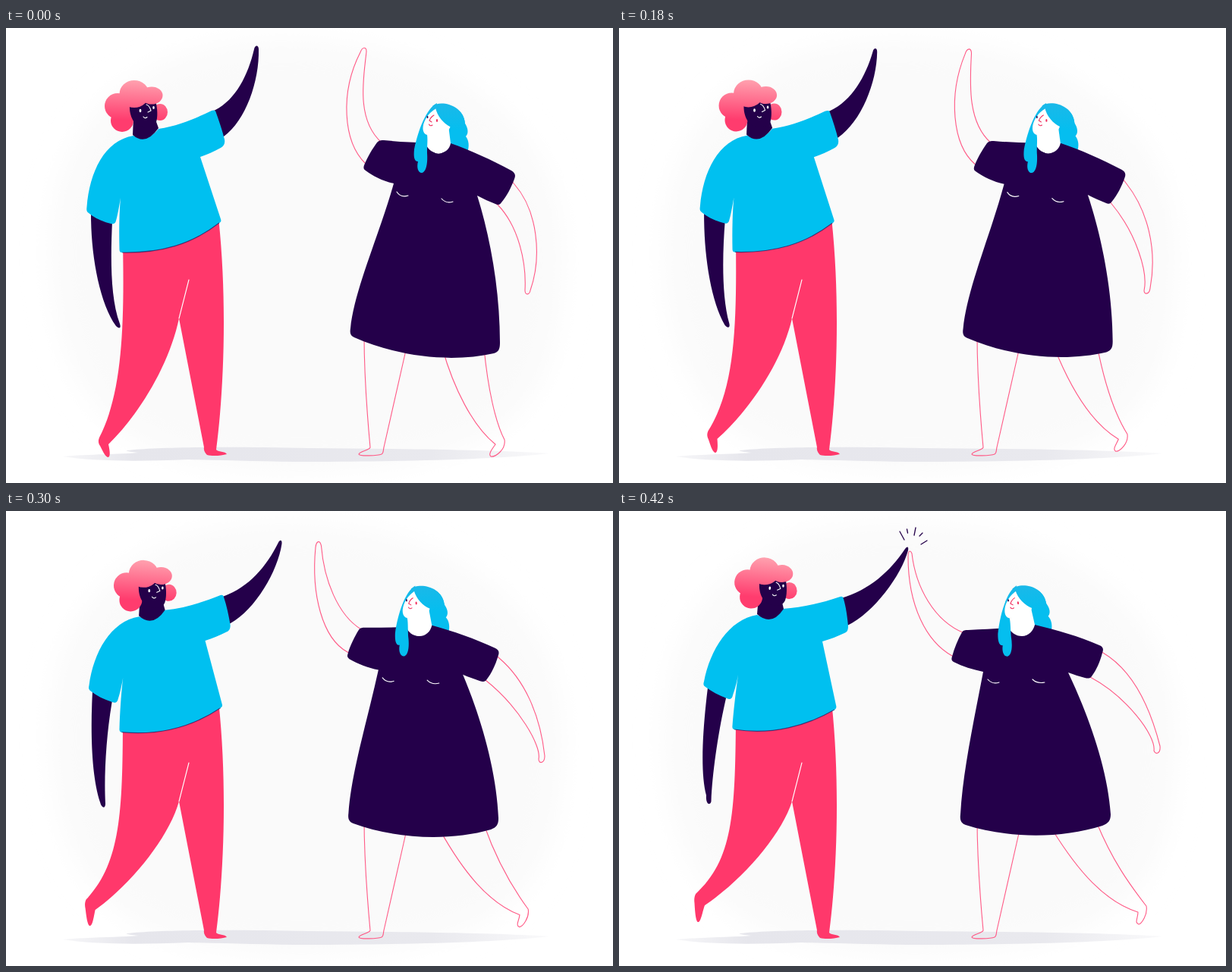
These frames come from a looping animation (800 px wide and 600 px high, 2700 ms). An HTML page:

```html
<!DOCTYPE html>
<html lang="en">
<head>
<meta charset="utf-8">
<title>High five</title>
<style>
  html, body { margin: 0; width: 100%; height: 100%; overflow: hidden; background: #fff; }
  svg { display: block; width: 100vw; height: 100vh; }
  .dark { fill: #24004a; }
  .blue { fill: #00c0f0; }
  .pink { fill: #ff386b; }
  .white { fill: #fff; }
  .limb { fill: none; stroke: #ff5a86; stroke-width: 1.1; stroke-linejoin: round; }
  .line { fill: none; stroke: #fff; stroke-width: 1.1; stroke-linecap: round; }
  .hem { fill: none; stroke: #24004a; stroke-width: 1.2; stroke-opacity: .6; }
  .feature { fill: none; stroke: #f0305f; stroke-width: 1.1; stroke-linecap: round; }
  .spark { fill: none; stroke: #24004a; stroke-width: 1.3; stroke-linecap: round; }
</style>
</head>
<body>
<svg viewBox="0 0 800 600">
  <defs>
    <filter id="soft" x="-20%" y="-20%" width="140%" height="140%"><feGaussianBlur stdDeviation="18"/></filter>
    <linearGradient id="ground" gradientUnits="userSpaceOnUse" x1="70" x2="725" y1="0" y2="0">
      <stop offset="0" stop-color="#e6e6ec" stop-opacity=".3"/>
      <stop offset=".15" stop-color="#e6e6ec"/>
      <stop offset=".75" stop-color="#e9e9ee"/>
      <stop offset="1" stop-color="#e9e9ee" stop-opacity=".2"/>
    </linearGradient>
    <linearGradient id="curls" gradientUnits="userSpaceOnUse" x1="172" x2="170" y1="68" y2="122">
      <stop offset="0" stop-color="#ffa3b0"/>
      <stop offset="1" stop-color="#ff3c6e"/>
    </linearGradient>
    <linearGradient id="locks" gradientUnits="userSpaceOnUse" x1="0" x2="0" y1="97" y2="135">
      <stop offset="0" stop-color="#1cb8e8"/>
      <stop offset="1" stop-color="#05beef"/>
    </linearGradient>
  </defs>
  <path filter="url(#soft)" fill="#fafafa" d="M330 18C560 8 735 110 732 300C730 480 690 570 420 584C170 590 80 520 62 330C50 160 130 35 330 18Z"/>
  <path fill="url(#ground)" d="M75 565C110 562 150 562 175 560C165 559 158 558 159 557C200 552 300 552 400 554C520 555 640 556 716 561C650 569 510 572 400 572C340 572 290 570 240 569C170 572 110 571 75 565Z"/>
  <g id="scene"></g>
  <path id="sparks" class="spark" d="M370 27L376 38M379.500 24L380.500 29M391 22L389 32M400 29L396 33M406 39L398 44"/>
</svg>
<script>
const LOOP = 2700, START = 90, STEP = 30, MID_STEP = 7, LAST_STEP = 11;

// progress at each step of the movement
const ease = {
  arm: [.01, .03, .085, .15, .235, .355, .49, .635, .79, .935, .98, 1],
  man: [.01, .02, .04, .07, .13, .24, .37, .54, .76, .94, .99, 1],
  manLeg: [0, .05, .13, .25, .38, .52, .66, .79, .9, .98, 1, 1],
  woman: [.01, .025, .06, .11, .18, .3, .45, .65, .82, .96, .99, 1],
  womanLeg: [0, .1, .21, .34, .47, .6, .72, .82, .91, .98, 1, 1]
};

const manHead = `
  <ellipse fill="url(#curls)" cx="203" cy="111" rx="10" ry="11"/>
  <g fill="url(#curls)">
    <ellipse cx="147" cy="103" rx="17" ry="17"/>
    <ellipse cx="153" cy="122" rx="15" ry="15"/>
    <ellipse cx="164" cy="106" rx="10" ry="12"/>
  </g>
  <path class="dark" d="M163 101L197 96C200 106 200 118 198 124C196 130 189 133 180 131C170 129 162 118 163 101Z"/>
  <g fill="url(#curls)">
    <ellipse cx="169" cy="87" rx="19.500" ry="18"/>
    <ellipse cx="192" cy="89" rx="14.500" ry="11.500"/>
  </g>
  <ellipse class="white" cx="177" cy="109" rx="1.4" ry="2.2"/>
  <ellipse class="white" cx="194.500" cy="105" rx="1.3" ry="2"/>
  <path class="line" d="M185 101Q189 102 191 109L187 111M181 117Q183 120 186 117.500"/>`;

const womanHead = `
  <path class="white" d="M566 103C558 110 553 122 550 133C549 139 554 141 559 140C570 145 584 140 586 128L580 108Z"/>
  <path fill="url(#locks)" d="M562 103C571 95 603 100 605 126C606 130 606 134 604 137L585 130C577 126 568 116 566 105Z"/>
  <path fill="url(#locks)" d="M568 99C554 106 543 135 538 160C537 170 538 176 543 176C541 184 543 191 548 191C554 190 556 178 555 165C555 155 556 147 555 141C548 139 548 129 553 120C557 113 562 109 567 106Z"/>
  <path class="feature" d="M564 115Q560 117 558 122L561 124M557.500 127Q559 130 562 128"/>
  <ellipse fill="#f0305f" cx="568" cy="122" rx="1.1" ry="1.9"/>
  <ellipse fill="#24004a" cx="555.500" cy="117.500" rx=".9" ry="1.7"/>`;

const braid = `<path fill="#05beef" d="M575 102C596 103 604 113 605 126C609 132 610 139 606 143C610 148 611 156 608 164L584 154Z"/>`;

const manTilt = p => `translate(${22 * p} ${-7.5 * p}) rotate(${3 * p} 172 105)`;
const womanTilt = p => `translate(${-40.5 * p} ${-1 * p}) rotate(${-5 * p} 570 140)`;

// back to front: shapes with two or three poses, or tilting groups
const parts = [
  { look: "dark", ease: "arm", poses: [
    "M260 116L276 108C303 94 319 62 327 28C328 22 333 22 333 28C334 70 316 122 287 143L270 150Z",
    "M275 120L293 115C330 104 357 80 377 50C380 46 382 47 381 52C372 85 336 134 301 151L285 157Z"] },
  { look: "dark", ease: "arm", poses: [
    "M112 235L112 246C112 300 123 362 145 393C149 397 152 396 150 390C137 355 138 300 140 255L135 235Z",
    "M117 225L114 238C111 295 113 350 124 384C126 392 131 393 131 386C129 350 132 295 140 250L137 235Z",
    "M120 222L117 233C110 290 107 345 115 375C114 387 120 389 121.5 383C123 345 131 290 141 247L137 230Z"] },
  { look: "pink", ease: "manLeg", poses: [
    "M154 284C156 390 154 480 123 540C121 545 122 548 124 551C127 557 130 564 134 566C138 566 137 558 135 549C175 510 215 445 228 383L261 553C260 557 263 561 265 563C272 565 284 564 291 562C289 558 279 559 277 556C287 480 292 360 280 250Z",
    "M154 276C153 400 150 460 101 505C99 509 99 513 99.5 517C100 526 101 541 104 542C108 543 110 528 113 520C165 485 215 425 228 383L261 553C260 557 263 561 265 563C272 565 284 564 291 562C289 558 279 559 277 556C287 480 292 360 280 250Z"] },
  { look: "line", ease: "man", poses: ["M241 332L228 383", "M241 332L228 383"] },
  { look: "blue", ease: "man", poses: [
    "M168 142Q186 152 201 133C228 129 250 119 270 109.5C274 108 276 108 277 112C281 123 285 135 288 147C289 152 287 156 283 158C274 163 265 167 256 170L283 252C284 255 283 256 281 257C245 285 205 297 153 296C150 296 149.5 294 149.5 291C149 270 149 245 151 224C149 236 147 247 145 254C144 258 142 259 138 258C126 255 116 250 109 244C106 242 106 240 106.5 236C110 190 130 148 168 142Z",
    "M182 137Q201 147 216 129C243 127 268 121 290 113.5C294 112 295 113 296 116C299 126 301 140 302 152C302 158 300 160 297 161C288 165 279 169 268 172L286 256C287 259 286 261 284 262C248 283 202 296 152 288C150 288 149 286 149.5 283C151 262 154 238 157 216C155 228 152 237 150 243C149 248 146 249 142 247C131 243 122 238 114 232C111 230 111 228 112 225C120 183 145 143 182 137Z"] },
  { look: "hem", ease: "man", poses: [
    "M281 257C245 285 205 297 153 296",
    "M284 262C248 283 202 296 152 288"] },
  { look: "dark", ease: "man", poses: [
    "M168 118L167 141Q184 156 201 132L196 118Z",
    "M184 112L182 136Q201 153 217 129L213 112Z"] },
  { html: manHead, ease: "man", tilt: manTilt },

  { html: braid, ease: "woman", tilt: womanTilt },
  { look: "limb", ease: "woman", poses: [
    "M478 185L474 179C444 150 440 85 467 32C470 24 475 25 475 31C472 62 460 120 495 151L500 155",
    "M456 190L450 186C417 168 402 110 408 48C409 39 414 38 415.5 46C419 90 437 137 468 156L474 160",
    "M446 196L439 191C405 172 381 125 381 60C381 52 384 51 386 56C391 100 415 145 455 161L460 165"] },
  { look: "limb", ease: "womanLeg", poses: [
    "M665 200L670 206C700 240 707 300 691 346C690 352 684 353 684 346C686 310 676 262 648 233L643 229",
    "M645 189L650 194C683 222 704 268 710 323C710 333 702 334 702 327C706 310 676 258 632 223L627 220",
    "M633 183L638 187C675 209 699 255 713 310C714 320 707 322 705 316C708 296 668 244 621 219L616 216"] },
  { look: "limb", ease: "womanLeg", poses: [
    "M472 405C472 460 476 510 480 553C479 557 466 558 465 562C466 565 490 564 495 562C498 560 497 557 498 553L527 425",
    "M472 405C472 460 476 510 480 553C479 557 466 558 465 562C466 565 490 564 495 562C498 560 497 557 498 553L527 425"] },
  { look: "limb", ease: "womanLeg", poses: [
    "M575 422C590 475 615 525 645 549C641 555 635 562 639 565C645 566 659 556 657 543C645 520 635 475 630 422",
    "M571 420C605 475 640 515 684 529C684 537 679 543 685 545C689 544 697 532 695 521C671 490 650 460 630 412"] },
  { look: "dark", ease: "woman", poses: [
    "M553 151Q570 180 586 152C612 161 640 174 666 188C671 191 672 194 670 199C666 210 660 222 653 230C651 233 649 234 645 232C637 229 629 225 621 221C638 275 651 345 651 415C651 424 649 427 643 429C590 441 520 435 459 408C454 406 453 402 454 396C459 345 493 270 511 205C497 202 483 195 474 188C471 186 471 184 472 181C476 171 483 159 489 151C492 148 494 148 498 148C518 150 536 151 553 151Z",
    "M514 154Q531 176 548 150C577 157 606 165 633 177C638 179 639 182 637 187C634 199 629 210 623 218C621 221 618 221 614 220C607 218 600 216 592 213C619 270 644 340 648 400C648 408 645 412 637 415C580 433 510 431 457 414C451 412 449 408 450 400C453 345 467 280 480 212C466 209 453 205 441 199C438 197 438 195 439 192C442 180 447 169 452 160C454 157 456 157 460 157C479 156 497 155 514 154Z"] },
  { look: "line", ease: "woman", poses: [
    "M515 216Q520 224 530 221M574 225Q580 232 589 229",
    "M486 222Q492 229 501 226M545 222Q551 228 561 226"] },
  { look: "white", ease: "woman", poses: [
    "M558 132L553 151C554 158 561 165 570 165C579 165 585 159 586 152L583 128Z",
    "M519 132L514 154C516 160 523 165 531 165C540 165 546 158 548 150L543 128Z"] },
  { html: womanHead, ease: "woman", tilt: womanTilt }
];

const scene = document.getElementById("scene");
const sparks = document.getElementById("sparks");
const NUM = /-?[\d.]+/g;

for (const part of parts) {
  const tag = part.html ? "g" : "path";
  part.node = document.createElementNS("http://www.w3.org/2000/svg", tag);
  if (part.html) {
    part.node.innerHTML = part.html;
  } else {
    part.node.setAttribute("class", part.look);
    part.points = part.poses.map(d => d.match(NUM).map(Number));
  }
  scene.append(part.node);
}

// blend two poses straight, or three along a curve through the middle one
function weights(count, p, mid) {
  if (count === 2) return [1 - p, p];
  return [
    (p - mid) * (p - 1) / mid,
    p * (p - 1) / (mid * (mid - 1)),
    p * (p - mid) / (1 - mid)
  ];
}

function shape(part, p) {
  const w = weights(part.poses.length, p, ease[part.ease][MID_STEP]);
  let i = 0;
  return part.poses[0].replace(NUM, () => {
    const v = part.points.reduce((sum, pts, k) => sum + pts[i] * w[k], 0);
    i++;
    return v.toFixed(2);
  });
}

let shown = null;
function draw(now) {
  const t = now % LOOP;
  const step = Math.max(-1, Math.min(LAST_STEP, Math.floor((t - START) / STEP)));
  if (step === shown) return;
  shown = step;
  for (const part of parts) {
    const p = step < 0 ? 0 : ease[part.ease][step];
    if (part.tilt) part.node.setAttribute("transform", part.tilt(p));
    else part.node.setAttribute("d", shape(part, p));
  }
  sparks.style.visibility = step === LAST_STEP ? "visible" : "hidden";
}

function tick() {
  draw(performance.now());
  requestAnimationFrame(tick);
}
tick();
</script>
</body>
</html>
```
